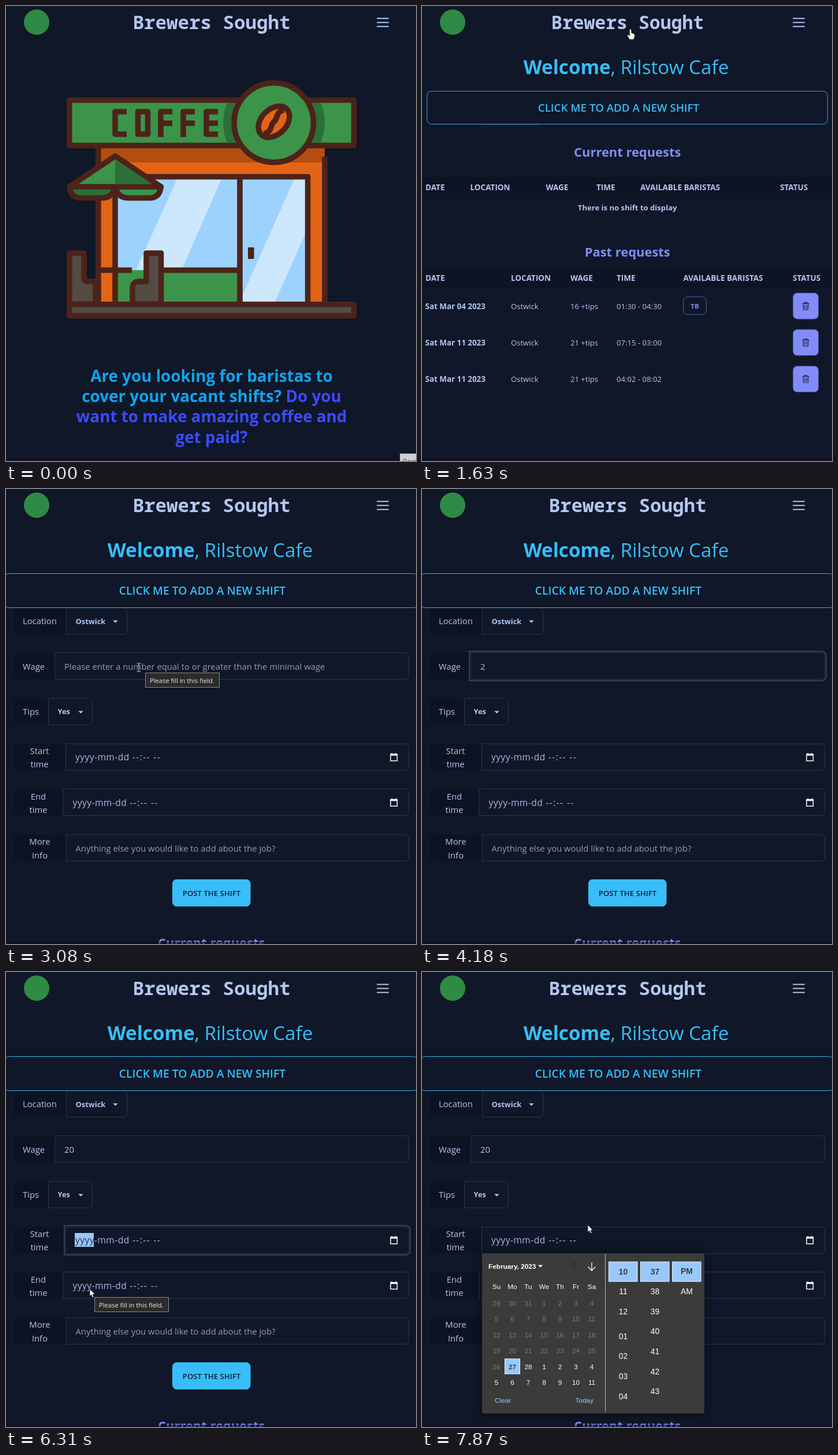
These frames come from a looping animation (710x788 px, 8000 ms). An HTML page:

```html
<!DOCTYPE html>
<html lang="en">
<head>
<meta charset="utf-8">
<title>Shift board</title>
<style>
html, body { margin: 0; width: 100%; height: 100%; overflow: hidden; background: #0f1728; }
svg { display: block; }
text { font-family: "Open Sans", "Noto Sans", sans-serif; fill: #b4c6ef; white-space: pre; }
.mid { text-anchor: middle; }
.brand { font: bold 32.5px "Noto Sans Mono", "DejaVu Sans Mono", monospace; }
.tag { font-size: 27.8px; font-weight: 700; fill: #0ea5f0; }
.tag .alt { fill: #3a4bff; }
.hello { font-size: 33.2px; fill: #38bdf8; }
.add { font-size: 19.35px; font-weight: 600; fill: #38bdf8; }
.h2 { font-size: 21.9px; font-weight: 700; fill: #818cf8; }
.th { font-size: 13.5px; font-weight: 700; }
.td { font-size: 13.1px; }
.day { font-size: 13.4px; font-weight: 700; }
.lab { font-size: 14.8px; }
.hint { font-size: 14.8px; fill: #929cb4; }
.date { font-size: 15.6px; letter-spacing: .4px; fill: #a9bae3; }
.time { font-size: 15.6px; letter-spacing: 1.35px; fill: #a9bae3; }
.opt { font-size: 12.9px; font-weight: 700; }
.tip text { font-size: 11.2px; fill: #ececec; }
.cal text { font: 11.8px "Liberation Sans", Arial, sans-serif; fill: #fff; }
.cal .b { font-weight: 700; }
.cal .big { font-size: 13.8px; }
.cal .old { fill: #7b7b7b; }
.cal .sel { fill: #3b3b3b; font-weight: 700; }
.cal .link { fill: #99c8ff; }
.box { fill: none; stroke: #29374c; }
.ring { fill: none; stroke: #364257; stroke-width: 2; stroke-linejoin: round; }

/* on/off switches */
.home, .dash, .rec, .hint.wage, .two, .zero, .caret, .caret2, .ringA, .ringB,
.tipA, .tipB, .pop-up, .arrow, .hand, .beam { animation: 8s step-end infinite; }
.home { animation-name: home; }
.dash { animation-name: dash; }
.rec { animation-name: rec; }
.hint.wage { animation-name: hint; }
.two { animation-name: two; }
.zero { animation-name: zero; }
.caret { animation-name: caret; }
.caret2 { animation-name: caret2; }
.ringA { animation-name: ringA; }
.ringB { animation-name: ringB; }
.tipA { animation-name: tipA; }
.tipB { animation-name: tipB; }
.pop-up { animation-name: popUp; }
.arrow { animation-name: arrow; }
.hand { animation-name: hand; }
.beam { animation-name: beam; }
@keyframes home { 0% { visibility: visible } 20.18%, 100% { visibility: hidden } }
@keyframes dash { 0% { visibility: hidden } 20.18%, 100% { visibility: visible } }
@keyframes rec { 0% { visibility: visible } 1.7%, 100% { visibility: hidden } }
@keyframes hint { 0% { visibility: inherit } 52.25%, 100% { visibility: hidden } }
@keyframes two { 0% { visibility: hidden } 52.25%, 100% { visibility: visible } }
@keyframes zero { 0% { visibility: hidden } 55%, 100% { visibility: visible } }
@keyframes caret { 0% { visibility: hidden } 40.2% { visibility: visible } 46.1%, 100% { visibility: hidden } }
@keyframes caret2 { 0% { visibility: hidden } 55% { visibility: visible } 61.2%, 100% { visibility: hidden } }
@keyframes ringA { 0% { visibility: hidden } 40.2% { visibility: visible } 70%, 100% { visibility: hidden } }
@keyframes ringB { 0% { visibility: hidden } 70% { visibility: visible } 91.2%, 100% { visibility: hidden } }
@keyframes tipA { 0% { visibility: hidden } 37.8% { visibility: visible } 40.2%, 100% { visibility: hidden } }
@keyframes tipB { 0% { visibility: hidden } 78.7% { visibility: visible } 82%, 100% { visibility: hidden } }
@keyframes popUp { 0% { visibility: hidden } 91.2%, 100% { visibility: visible } }
@keyframes arrow { 0% { visibility: visible } 8.3% { visibility: hidden } 33.9% { visibility: visible }
  35.6% { visibility: hidden } 57.2%, 100% { visibility: visible } }
@keyframes hand { 0% { visibility: hidden } 8.3% { visibility: visible } 33.9%, 100% { visibility: hidden } }
@keyframes beam { 0% { visibility: hidden } 35.6% { visibility: visible } 42.1% { visibility: hidden }
  56% { visibility: visible } 57.2%, 100% { visibility: hidden } }

/* motion */
.pop, .title { transform-box: fill-box; transform-origin: center; }
.pop { animation: pop 8s infinite; }
.title { animation: title 8s infinite; }
.hover { animation: hover 8s linear infinite; }
.bars { animation: bars 8s step-end infinite; }
.list { animation: list 8s infinite; }
.cursor { animation: travel 8s ease-in-out infinite; }
@keyframes pop {
  0% { transform: scale(1); animation-timing-function: step-end }
  20.18% { transform: scale(.95); animation-timing-function: ease-out }
  21.4% { transform: scale(1.02); animation-timing-function: ease-out }
  23.25%, 100% { transform: scale(1) }
}
@keyframes title {
  0% { transform: scale(1); animation-timing-function: step-end }
  10.95% { transform: scale(.97); animation-timing-function: step-end }
  12.7% { transform: scale(.95); animation-timing-function: ease-out }
  14% { transform: scale(1.02); animation-timing-function: ease-out }
  15.9% { transform: scale(1); animation-timing-function: step-end }
  20.18% { transform: scale(.95); animation-timing-function: ease-out }
  21.4% { transform: scale(1.02); animation-timing-function: ease-out }
  23.25%, 100% { transform: scale(1) }
}
@keyframes hover { 0%, 8.2% { opacity: 0 } 9.8%, 20.17% { opacity: 1 } 20.18%, 100% { opacity: 0 } }
@keyframes bars { 0% { stroke: #a3d4f5 } 20.18%, 100% { stroke: #b4c6ef } }
@keyframes list { 0%, 29.2% { transform: none } 31.6%, 100% { transform: translateY(533px) } }
@keyframes travel {
  0%, .9% { transform: translate(705px, 800px) }
  9.9%, 23% { transform: translate(361px, 40px) }
  28.5%, 33.3% { transform: translate(324px, 188px) }
  36.5%, 56% { transform: translate(230px, 309px) }
  61.7% { transform: translate(544px, 499px) }
  64% { transform: translate(577px, 498px) }
  69.5%, 72.5% { transform: translate(641px, 462px) }
  76.8%, 81.8% { transform: translate(145px, 549px) }
  88.2% { transform: translate(656px, 461px) }
  90.4%, 91.6% { transform: translate(668px, 463px); animation-timing-function: ease-in }
  95.5% { transform: translate(480px, 428px); animation-timing-function: ease-out }
  98.2%, 100% { transform: translate(287px, 438px) }
}
</style>
</head>
<body>
<svg width="710" height="788" viewBox="0 0 710 788">
<defs>
  <clipPath id="board"><rect x="114" y="168" width="484" height="69"/></clipPath>
  <filter id="soft" x="-20%" y="-20%" width="140%" height="140%"><feGaussianBlur stdDeviation="9"/></filter>
  <g id="dateIcon" fill="none" stroke="#fff" stroke-width="1.5">
    <path d="M-5.7 -5.2H5.7V6.3H-5.7Z"/><path d="M-5.7 -4.2H5.7" stroke-width="3"/><path d="M-3.5 -7.3V-5M3.5 -7.3V-5"/>
  </g>
  <path id="chev" d="M-4.3 -2H4.3L0 2.3Z" fill="#b4c6ef"/>
  <g id="tip" class="tip">
    <rect x=".5" y=".5" width="128" height="25" fill="#2b2b2b" stroke="#8a8a8a"/>
    <text x="8" y="17.5">Please fill in this field.</text>
  </g>
  <g id="bin" fill="none" stroke="#131a3a" stroke-width="1.2">
    <path d="M-6 -4.5H6M-2.3 -4.5V-6.3H2.3V-4.5M-4.6 -4.5L-4 6.3H4L4.6 -4.5M-1.7 -2V4M1.7 -2V4"/>
  </g>
</defs>
<rect width="710" height="788" fill="#0f1728"/>

<g class="home">
  <g stroke="#4d2319" stroke-width="9.6" stroke-linejoin="round">
    <g stroke="none">
      <rect x="160" y="242" width="392" height="272" fill="#e36414"/>
      <rect x="160" y="242" width="392" height="29" fill="#b34e10"/>
      <rect x="190" y="296" width="332" height="218" fill="#9dd2ff"/>
      <path d="M296 300H373L304 457H225ZM499 300H518V395L466 512H410V500Z" fill="#cde7fd"/>
      <rect x="190" y="457.5" width="214" height="56" fill="#3b944a"/>
      <rect x="419" y="418" width="10.5" height="20" fill="#4d2319"/>
    </g>
    <path fill="none" d="M159.8 244V514M552 261V514M225 295.7H522.6V514M405 296V514M160 457.5H218M270 457.5H405"/>
    <path fill="none" d="M189 316V514"/>
    <path fill="#524c44" d="M109.8 516V428H135V471Q135 477 141 477H155V516ZM219 516V489Q219 477 231 477H243V428H268.5V516Z"/>
    <path fill="none" d="M159.8 477V514"/>
    <rect x="109.8" y="516.8" width="492.6" height="19.6" fill="#524c44"/>
    <path fill="#2c6f38" d="M110 313Q112 332.3 130 332.5H166Q186 332 188 313Z"/>
    <path fill="#3b944a" d="M190 313Q192 332 212 332.5H249Q266 332.3 268.3 313Z"/>
    <path fill="#3b944a" d="M189 260L110 313H268.3Z"/>
    <path fill="#2c6f38" stroke="none" d="M189 265L253 308.4H189Z"/>
    <rect x="109.8" y="163" width="492.6" height="78.6" fill="#3b944a"/>
    <circle cx="464" cy="202" r="88" fill="#2c6f38" stroke="none" clip-path="url(#board)"/>
    <path fill="none" d="M209 183H189V222H209M228.5 183H245.5V222H228.5ZM288 183H268V227M268 203H288M327 183H307V227M307 203H327M367 183H347V222H367M347 203H367"/>
    <circle cx="463.7" cy="202" r="68.7" fill="#3b944a"/>
    <ellipse cx="464" cy="200.5" rx="31.2" ry="21.8" transform="rotate(-45 464 200.5)" fill="#e36414"/>
    <path fill="none" d="M447 221C463 217 456 207 464 200.5S466 184 481 180"/>
  </g>
  <g class="mid">
    <text class="tag" x="356" y="651">Are you looking for baristas to</text>
    <text class="tag" x="356" y="686">cover your vacant shifts? <tspan class="alt">Do you</tspan></text>
    <text class="tag" x="356" y="721"><tspan class="alt">want to make amazing coffee and</tspan></text>
    <text class="tag" x="356" y="757"><tspan class="alt">get paid?</tspan></text>
  </g>
</g>

<g class="dash">
  <g id="form">
    <text class="lab" x="29" y="234">Location</text>
    <text class="lab" x="29" y="313">Wage</text>
    <text class="lab" x="29" y="391">Tips</text>
    <text class="opt" x="120.5" y="233.5">Ostwick</text><use href="#chev" x="189.5" y="229.5"/>
    <text class="opt" x="89.5" y="390">Yes</text><use href="#chev" x="129.5" y="386.5"/>
    <g class="mid">
      <text class="lab" x="58" y="458.5">Start</text><text class="lab" x="58" y="482">time</text>
      <text class="lab" x="56" y="537.5">End</text><text class="lab" x="56" y="560.5">time</text>
      <text class="lab" x="58.5" y="616">More</text><text class="lab" x="58.5" y="639.5">Info</text>
    </g>
    <text class="hint wage" x="101" y="313">Please enter a number equal to or greater than the minimal wage</text>
    <text class="lab two" x="101" y="313">2</text><text class="lab zero" x="109.5" y="313">0</text>
    <rect class="caret" x="101" y="296" width="1" height="21" fill="#b4c6ef"/>
    <rect class="caret2" x="118.5" y="296" width="1" height="21" fill="#b4c6ef"/>
    <text class="date" x="120" y="470">yyyy-mm-dd</text><text class="time" x="219" y="470">--:-- --</text>
    <text class="date" x="115.5" y="549">yyyy-mm-dd</text><text class="time" x="214.5" y="549">--:-- --</text>
    <use href="#dateIcon" x="671.7" y="464.5"/><use href="#dateIcon" x="671.7" y="543"/>
    <text class="hint" x="120.5" y="628">Anything else you would like to add about the job?</text>
    <rect x="288" y="676" width="135.5" height="47" rx="7.5" fill="#38bdf8"/>
    <text class="mid" x="356" y="705" style="font-size:13.2px;font-weight:600;fill:#0b2236">POST THE SHIFT</text>
    <path class="ring ringA" d="M82 281H691q9 0 9 9v33q0 9 -9 9H82Z"/>
    <g class="ringB">
      <path class="ring" d="M101 439H691q9 0 9 9v33q0 9 -9 9H101Z"/>
      <rect x="119" y="452" width="33" height="24" fill="#9ac8fc"/>
      <text class="date" x="120" y="470" style="fill:#26334d">yyyy</text>
    </g>
  </g>
  <g class="list" id="list">
    <rect y="206" width="710" height="600" fill="#0f1728"/>
    <rect y="295" width="710" height="38" fill="#0d1424"/>
    <rect y="452" width="710" height="37" fill="#0d1424"/>
    <text class="h2 mid" x="355.7" y="261">Current requests</text>
    <text class="mid" x="355.7" y="354" style="font-size:13.1px;font-weight:700">There is no shift to display</text>
    <text class="h2 mid" x="355.7" y="434">Past requests</text>
    <g class="pop">
      <rect x="452" y="503.3" width="41" height="31.4" rx="7.5" fill="none" stroke="#5a64b8"/>
      <text class="mid" x="472.5" y="524" style="font-size:11.8px;font-weight:700;fill:#818cf8">TB</text>
    </g>
  </g>
  <text class="hello" x="175.7" y="117.5"><tspan font-weight="700">Welcome</tspan>, Rilstow Cafe</text>
  <g class="pop">
    <rect x="-2.5" y="146.5" width="716" height="59" rx="8" fill="#0f1728" stroke="#38b0e8"/>
    <text class="add mid" x="340" y="183">CLICK ME TO ADD A NEW SHIFT</text>
  </g>
</g>

<circle cx="53" cy="28" r="22" fill="#2f8a45"/>
<g class="title">
  <rect class="hover" x="204" y="5" width="305" height="47" rx="7.5" fill="#2a364a"/>
  <text class="brand mid" x="356" y="40">Brewers Sought</text>
</g>
<g class="pop bars" stroke-width="2.2" stroke-linecap="round"><path d="M643 21.5H662M643 28.5H662M643 35.5H662"/></g>
<rect y="784" width="710" height="4" fill="#170a22" opacity=".55"/>

<g class="rec">
  <rect x="682.5" y="775.5" width="40" height="30" fill="#cfcfd2" stroke="#a9a9ad"/>
  <text x="687" y="793" style="font-size:12px;fill:#555">Reco</text>
</g>
<g class="tipA"><use href="#tip" x="241" y="318"/></g>
<g class="tipB"><use href="#tip" x="153" y="563"/></g>

<g class="cal pop-up" id="cal">
  <rect x="104" y="490" width="385" height="277" fill="#000" opacity=".45" filter="url(#soft)"/>
  <rect x="104" y="487" width="385" height="277.5" rx="4" fill="#3b3b3b"/>
  <path d="M317.5 488V762" stroke="#b5b5b5"/>
  <text class="b" x="115" y="513.5">February, 2023</text>
  <path d="M201 507.5H209L205 511.8Z" fill="#fff"/>
  <path d="M262.5 517V503M256 509.5L262.5 503L269 509.5" fill="none" stroke="#2d2d2d" stroke-width="1.3"/>
  <path d="M294 503V517M287.5 510.5L294 517L300.5 510.5" fill="none" stroke="#fff" stroke-width="1.3"/>
  <text class="link" x="126" y="745.5">Clear</text><text class="link" x="265.5" y="745.5">Today</text>
</g>

<g class="cursor">
  <path class="arrow" d="M0 0V12.5L2.8 10L4.8 14.8L7 13.8L5 9.2H9Z" fill="#fff" stroke="#15151c" stroke-width=".8"/>
  <path class="hand" d="M-1.7 1Q0 -1 1.7 1V6.5L6 8Q8 9 7.2 13L5.5 18H-1.5L-5.5 11.5Q-5 9 -3.3 10L-1.7 12Z" fill="#fdf8ea" stroke="#1c1c22" stroke-width=".8"/>
  <path class="beam" d="M-3.5 -7.5Q0 -7.5 0 -5.5Q0 -7.5 3.5 -7.5M0 -6V6M-3.5 7.5Q0 7.5 0 5.5Q0 7.5 3.5 7.5" fill="none" stroke="#c9ccd4"/>
</g>
</svg>

<script>
const NS = 'http://www.w3.org/2000/svg';
const $ = id => document.getElementById(id);

function add(parent, tag, attrs, content = '') {
  const el = document.createElementNS(NS, tag);
  for (const key in attrs) el.setAttribute(key, attrs[key]);
  el.textContent = content;
  parent.append(el);
  return el;
}
const label = (parent, cls, x, y, content) => add(parent, 'text', { class: cls, x, y }, content);

// form rows: top, field left, field right
const form = $('form');
[[205.5, 104.5, 209.5], [283.5, 84.5, 697.5], [362.5, 73.5, 149.5], [441.5, 103.5, 697.5], [519.5, 98.5, 697.5], [598.5, 104.5, 697.5]]
  .forEach(([y, l, r]) => {
    const field = add(form, 'path', { class: 'box', d: `M${l} ${y}H${r - 7}q7 0 7 7v32q0 7 -7 7H${l}Z` });
    const back = add(form, 'path', { fill: '#0c1322', d: `M${l} ${y}H20q-7 0 -7 7v32q0 7 7 7H${l}Z` });
    form.prepend(back, field);
  });

// tables
const list = $('list');
const heads = ['DATE', 'LOCATION', 'WAGE', 'TIME', 'AVAILABLE BARISTAS', 'STATUS'];
const cols = [6, 154, 257, 337, 452.5, 642];
[[319, [6, 83.5, 214.5, 302, 378, 620]], [475.5, cols]].forEach(([y, xs]) =>
  heads.forEach((name, i) => label(list, 'th', xs[i], y, name)));
[['Sat Mar 04 2023', '16 +tips', '01:30 - 04:30'],
 ['Sat Mar 11 2023', '21 +tips', '07:15 - 03:00'],
 ['Sat Mar 11 2023', '21 +tips', '04:02 - 08:02']].forEach(([day, wage, time], i) => {
  const y = 525 + i * 63.2;
  label(list, 'day', 5.5, y, day);
  [['Ostwick', 1], [wage, 2], [time, 3]].forEach(([value, c]) => label(list, 'td', cols[c], y, value));
  const button = add(list, 'g', { class: 'pop' });
  add(button, 'rect', { x: 641.7, y: y - 28.7, width: 45.6, height: 46.6, rx: 7.5, fill: '#818cf8' });
  add(button, 'use', { href: '#bin', x: 664.5, y: y - 5.5 });
});

// date and time picker
const cal = $('cal');
const mark = (x, y, w, h) => add(cal, 'rect', { x, y, width: w, height: h, fill: '#99c8ff', stroke: '#f4f8ff' });
mark(143.5, 670, 26, 26);
[323.5, 378.5, 433.5].forEach(x => mark(x, 502, 49.5, 34));
['Su', 'Mo', 'Tu', 'We', 'Th', 'Fr', 'Sa'].forEach((d, i) => label(cal, 'mid', 129 + i * 27.5, 548.5, d));
for (let i = 0; i < 42; i++) {
  const date = new Date(2023, 0, 29 + i).getDate();
  const cls = i < 29 ? 'old' : i === 29 ? 'sel' : '';
  label(cal, 'mid ' + cls, 129 + (i % 7) * 27.5, 578 + Math.floor(i / 7) * 27.4, date);
}
const pad = n => String(n).padStart(2, '0');
for (let i = 0; i < 7; i++) {
  const cls = 'mid big' + (i ? '' : ' sel');
  const y = 523.5 + i * 34.6;
  label(cal, cls, 348.5, y + (i > 2 ? 8.5 : 0), pad((9 + i) % 12 + 1));
  label(cal, cls, 403.5, y, 37 + i);
  if (i < 2) label(cal, cls, 458.3, y - .5, i ? 'AM' : 'PM');
}
</script>
</body>
</html>
```
